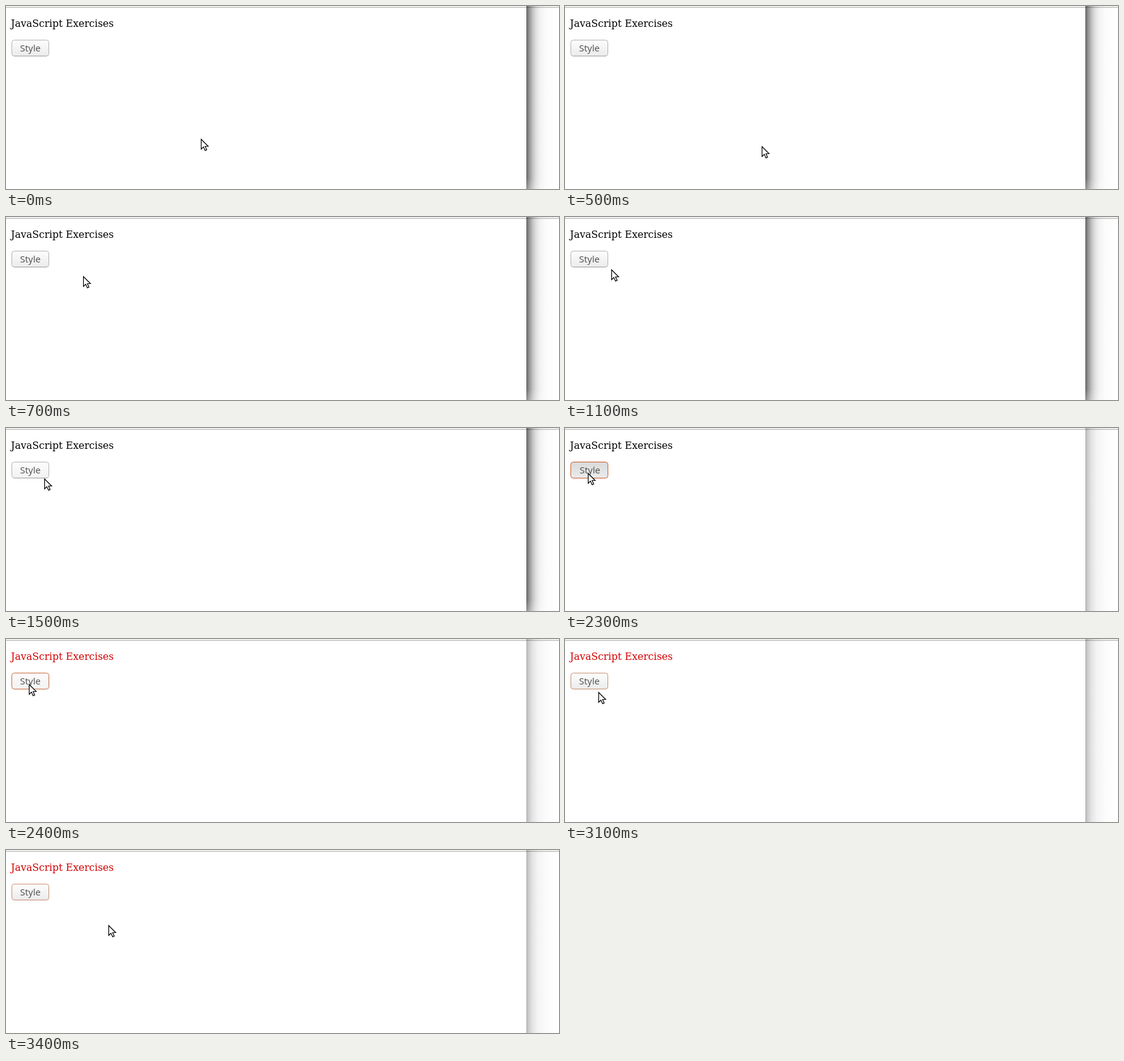
Recreate the animation shown at these times as an HTML page. Size 897 px wide and 298 px high, loop 5100 ms.

```html
<!DOCTYPE html>
<html lang="en">
<head>
<meta charset="utf-8">
<style>
  html, body { margin: 0; width: 100%; height: 100%; overflow: hidden; background: #fff; }
  svg { display: block; }
  .title { font: 16px "DejaVu Serif", serif; }
  .label { font: 15px "Open Sans", sans-serif; fill: #4c4c4c; }
</style>
</head>
<body>
<svg width="897" height="298" viewBox="0 0 897 298">
  <defs>
    <linearGradient id="strong">
      <stop offset="0" stop-opacity=".6"/>
      <stop offset=".1" stop-opacity=".4"/>
      <stop offset=".2" stop-opacity=".23"/>
      <stop offset=".3" stop-opacity=".12"/>
      <stop offset=".42" stop-opacity=".05"/>
      <stop offset=".6" stop-opacity=".015"/>
      <stop offset="1" stop-opacity="0"/>
    </linearGradient>
    <linearGradient id="weak">
      <stop offset="0" stop-opacity=".29"/>
      <stop offset=".08" stop-opacity=".19"/>
      <stop offset=".2" stop-opacity=".1"/>
      <stop offset=".35" stop-opacity=".045"/>
      <stop offset=".6" stop-opacity=".015"/>
      <stop offset="1" stop-opacity="0"/>
    </linearGradient>
    <linearGradient id="corner" x2="0" y2="1">
      <stop offset="0" stop-color="#fff" stop-opacity="0"/>
      <stop offset="1" stop-color="#fff" stop-opacity=".25"/>
    </linearGradient>
    <linearGradient id="face" x2="0" y2="1">
      <stop offset="0"/>
      <stop offset="1"/>
    </linearGradient>
  </defs>

  <rect width="897" height="298" fill="#fff"/>
  <rect width="897" height="2" fill="#f2f1f0"/>
  <rect y="2" width="897" height="1" fill="#b8b6b4"/>
  <rect id="shadow" x="844" width="53" height="298"/>
  <rect id="fade" x="844" y="280" width="53" height="18" fill="url(#corner)"/>

  <text id="title" class="title" x="8" y="34">JavaScript Exercises</text>

  <rect id="glow" x="8.5" y="54.5" width="62" height="28" rx="5" fill="none" stroke="#e0703a"/>
  <rect id="button" x="9.5" y="55.5" width="60" height="26" rx="4" fill="url(#face)"/>
  <path id="base" d="M13 81.5H66" stroke="#9c9c9c"/>
  <text id="label" class="label" x="39.5" y="74" text-anchor="middle">Style</text>

  <path id="cursor" d="M.6 1V17L4.3 13.5 7 19.4 9.6 18.3 7 12.5H12Z"
        fill="#fff" stroke="#000" stroke-width="1.2"/>
</svg>

<script>
const LOOP = 5100, PRESS = 2300, RELEASE = 2400;
const el = id => document.getElementById(id);
const stops = el('face').children;

// Button looks: gradient top, gradient bottom, border, glow opacity
const looks = {
  normal:  ['#fdfdfd', '#ebebeb', '#b2b2b2', 0],
  hover:   ['#fdfdfd', '#f1f1f1', '#b2b2b2', 0],
  pressed: ['#dadada', '#ebebeb', '#c9673c', .16],
  active:  ['#fdfdfd', '#f1f1f1', '#c9754c', .12],
  focused: ['#fdfdfd', '#ebebeb', '#c58f70', 0]
};

// Pointer samples: time, x, y, button look
const steps = [
  [0, 316, 216, 'normal'],
  [500, 319, 228, 'normal'],
  [600, 232, 163, 'normal'],
  [700, 125, 96, 'normal'],
  [1000, 98, 90, 'normal'],
  [1100, 75, 85, 'normal'],
  [1300, 72, 84, 'normal'],
  [1400, 67, 83, 'normal'],
  [1500, 62, 82, 'hover'],
  [1600, 58, 82, 'hover'],
  [1800, 46, 77, 'hover'],
  [1900, 37, 73, 'hover'],
  [PRESS, 37, 73, 'pressed'],
  [RELEASE, 37, 73, 'active'],
  [3100, 54, 86, 'focused'],
  [3200, 97, 100, 'focused'],
  [3300, 145, 115, 'focused'],
  [3400, 166, 122, 'focused']
];

function draw(now) {
  const t = now % LOOP;
  const [, x, y, look] = steps.findLast(step => step[0] <= t);
  const [top, bottom, border, glow] = looks[look];
  const plain = look === 'normal' || look === 'hover';

  el('cursor').setAttribute('transform', `translate(${x} ${y})`);
  stops[0].setAttribute('stop-color', top);
  stops[1].setAttribute('stop-color', bottom);
  el('button').setAttribute('stroke', border);
  el('glow').setAttribute('opacity', glow);
  el('base').setAttribute('opacity', plain ? 1 : 0);
  el('label').setAttribute('x', look === 'pressed' ? 40.5 : 39.5);
  el('title').setAttribute('fill', t < RELEASE ? '#000' : '#d40000');
  el('shadow').setAttribute('fill', t < PRESS ? 'url(#strong)' : 'url(#weak)');
  el('fade').setAttribute('opacity', t < PRESS ? 1 : 0);
  requestAnimationFrame(draw);
}

draw(0);
</script>
</body>
</html>
```
